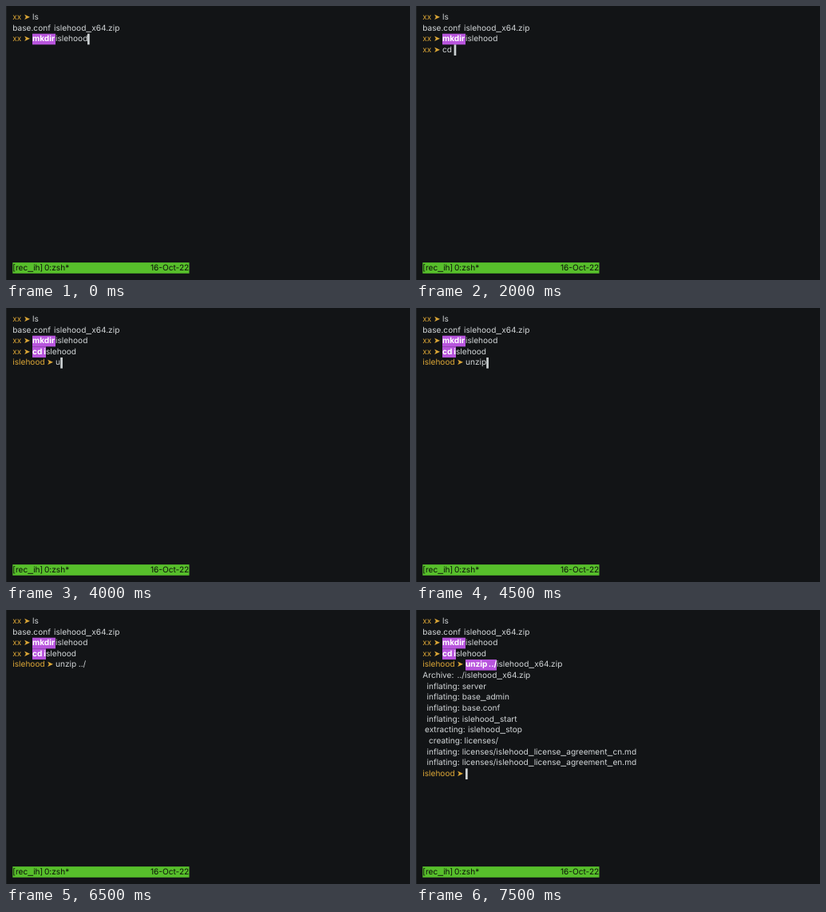
Animation, 506 px wide and 343 px high, one loop 8000 ms. Source, as an HTML page:

```html
<!DOCTYPE html>
<html lang="en">
<head>
<meta charset="utf-8">
<title>Terminal session</title>
<style>
  html, body { margin: 0; width: 100%; height: 100%; overflow: hidden; background: #121416; }
  svg { display: block; width: 506px; height: 343px; }
  text { font: 400 10.1px Inter, Roboto, sans-serif; fill: #d3d7d9; text-rendering: geometricPrecision; }
  .prompt { fill: #dba636; }
  .arrow { font-family: "DejaVu Sans", sans-serif; }
  .bold { font-weight: 700; fill: #fff; }
  .status { fill: #0c100a; }
  .wide { font: 11.5px "Noto Sans Mono", monospace; }
</style>
</head>
<body>
<svg id="stage" viewBox="0 0 506 343">
  <rect width="506" height="343" fill="#121416"/>
  <rect width="1" height="343" fill="#202326"/>
</svg>
<script>
const LOOP = 8000, ROW = 13.64, TOP = 7.4, LEFT = 8.3;
const NAME = "islehood", ZIP = NAME + "_x64.zip";
const stage = document.getElementById("stage");
const rowTop = row => TOP + row * ROW;

function make(parent, tag, attrs, content = "") {
  const node = document.createElementNS(stage.namespaceURI, tag);
  for (const key in attrs) node.setAttribute(key, attrs[key]);
  node.textContent = content;
  parent.append(node);
  return node;
}

function show(node, from = 0, to = LOOP) {
  if (from === 0 && to === LOOP) return;
  const steps = [[from, 1], [to, 0]];
  if (from > 0) steps.unshift([0, 0]);
  if (to < LOOP) steps.push([LOOP, 0]);
  const frames = steps.map(([time, opacity]) =>
    ({ offset: time / LOOP, opacity, easing: "steps(1, end)" }));
  node.animate(frames, { duration: LOOP, iterations: Infinity }).startTime = 0;
}

// Underscores are set in a wider face than the letters.
function write(row, x, content, from, to, style = "") {
  const line = make(stage, "text", { x, y: rowTop(row) + 9.5, class: style });
  for (const part of content.split(/(_)/))
    make(line, "tspan", part === "_" ? { class: "wide" } : {}, part);
  show(line, from, to);
}

const block = (row, x, width, fill, from, to) =>
  show(make(stage, "rect", { x, y: rowTop(row), width, height: ROW, fill }), from, to);

const cursor = (row, x, from, to) => block(row, x, 2.7, "#ccd1d3", from, to);

function prompt(row, dir, arrowX, from) {
  write(row, LEFT, dir, from, LOOP, "prompt");
  write(row, arrowX, "➤", from, LOOP, "prompt arrow");
}

function highlight(row, x, end, words, from) {
  block(row, x, end - x, "#b855dd", from);
  for (const [wordX, word] of words) write(row, wordX, word, from, LOOP, "bold");
}

// Status bar
block(23, LEFT, 221.2, "#57bf2b");
write(23, LEFT, "[rec_ih]", 0, LOOP, "status");
write(23, 48, "0:zsh*", 0, LOOP, "status");
write(23, 181, "16-Oct-22", 0, LOOP, "status");

// Directory listing
prompt(0, "xx", 22, 0);
write(0, 33, "ls");
write(1, LEFT, "base.conf");
write(1, 60, ZIP);

// Make directory
prompt(2, "xx", 22, 0);
highlight(2, 33, 62, [[33, "mkdir"]], 0);
write(2, 62, NAME);
cursor(2, 102, 0, 1000);

// Change directory
prompt(3, "xx", 22, 1000);
cursor(3, 33, 1000, 1500);
write(3, 33, "cd", 2000, 3000);
cursor(3, 47.6, 2000, 2500);
write(3, 47.4, NAME[0], 2500, 3000);
cursor(3, 50.2, 2500, 3000);
highlight(3, 33, 50, [[33, "cd"], [47.2, NAME[0]]], 3000);
write(3, 50, NAME.slice(1), 3000);

// Unpack: text typed, its start, cursor after it
prompt(4, NAME, 51, 3000);
cursor(4, 62, 3000, 4000);
write(4, 62, "u", 4000, 4500);
cursor(4, 68.2, 4000, 4500);
write(4, 62, "unzip", 4500, 7000);
cursor(4, 88.2, 4500, 5500);
write(4, 90.8, ".", 5500, 6000);
cursor(4, 93.8, 5500, 6000);
write(4, 90.8, "../", 6000, 7000);
cursor(4, 101, 6000, 6500);
highlight(4, 62, 101, [[62, "unzip"], [90.8, "../"]], 7000);
write(4, 101, ZIP, 7000);

// Unpack report
[
  [LEFT, "Archive:", 51.5, "../" + ZIP],
  [13.5, "inflating:", 57.7, "server"],
  [13.5, "inflating:", 57.7, "base_admin"],
  [13.5, "inflating:", 57.7, "base.conf"],
  [13.5, "inflating:", 57.7, NAME + "_start"],
  [11, "extracting:", 65, NAME + "_stop"],
  [16, "creating:", 60.5, "licenses/"],
  [13.5, "inflating:", 57.7, `licenses/${NAME}_license_agreement_cn.md`],
  [13.5, "inflating:", 57.7, `licenses/${NAME}_license_agreement_en.md`],
].forEach(([labelX, label, fileX, file], i) => {
  write(5 + i, labelX, label, 7000);
  write(5 + i, fileX, file, 7000);
});
cursor(14, LEFT, 7000, 7500);
prompt(14, NAME, 51, 7500);
cursor(14, 62, 7500);
</script>
</body>
</html>
```
